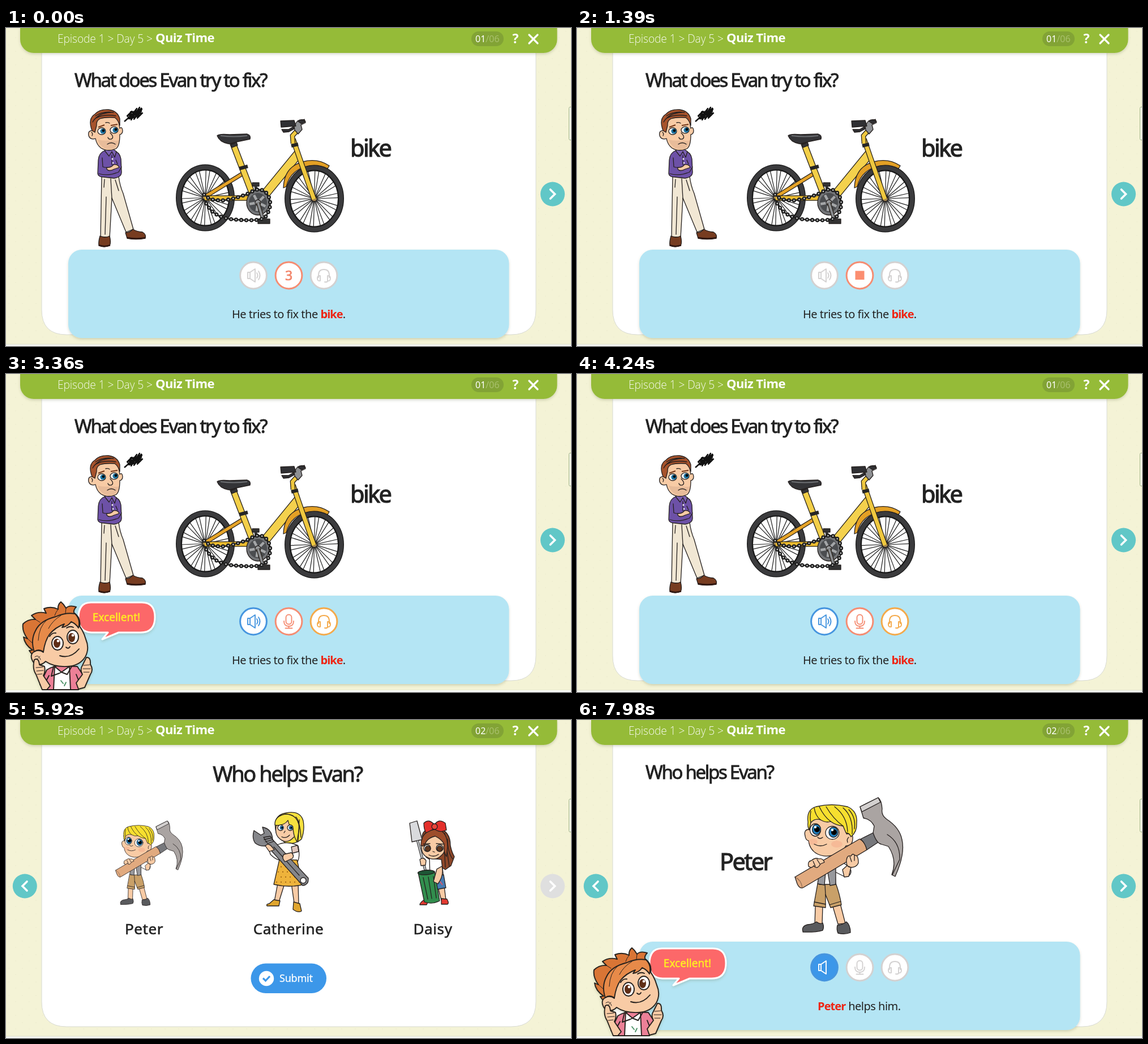
Write an HTML page that moves like this. It is 998 by 561 pixels and loops after 8 s.

```html
<!DOCTYPE html>
<html lang="en">
<head>
<meta charset="utf-8">
<title>Quiz Time</title>
<style>
html, body { margin: 0; width: 100%; height: 100%; overflow: hidden; background: #f4f3d6; }
svg { display: block; width: 100%; height: 100%; }
text { font-family: "Noto Sans", "Open Sans", sans-serif; fill: #222; white-space: pre; }
.title, .big, .ask { stroke: #222; stroke-width: .9px; }
.title { font-size: 33px; letter-spacing: -2.3px; }
.big { font-size: 41.5px; letter-spacing: -2.6px; stroke-width: 1.2px; }
.ask { font-size: 38px; letter-spacing: -2.4px; text-anchor: middle; }
.line { font-size: 20px; letter-spacing: -.5px; }
.red { fill: #ee2413; font-weight: 700; letter-spacing: -.9px; }
.name { font-size: 26px; letter-spacing: .6px; text-anchor: middle; fill: currentColor; stroke: currentColor; stroke-width: .6px; }
.o { stroke: #25201f; stroke-width: 1.3; stroke-linejoin: round; stroke-linecap: round; }
.n { fill: none; }
.skin { fill: #f8cba5; }
.icon { fill: none; stroke: currentColor; stroke-width: 1.9; stroke-linejoin: round; stroke-linecap: round; }
</style>
</head>
<body>
<svg viewBox="0 0 998 561" preserveAspectRatio="none">
<defs>
  <filter id="soft" x="-10%" y="-10%" width="120%" height="130%"><feDropShadow dx="0" dy="2.5" stdDeviation="2" flood-color="#5d6b3c" flood-opacity=".24"/></filter>
  <pattern id="dots" width="24" height="24" patternUnits="userSpaceOnUse"><g fill="#efeed0"><circle cx="5" cy="6" r="1"/><circle cx="17" cy="17" r="1"/></g></pattern>
  <linearGradient id="tube" x2="1" y2="1"><stop stop-color="#ffe887"/><stop offset="1" stop-color="#eec12f"/></linearGradient>

  <g id="boy">
    <path class="o skin" d="M421 328L420 361L433 361L434 328ZM451 326L461 360L474 359L465 324Z"/>
    <path class="o" fill="#595a5d" d="M399 373Q396 364 407 361Q418 360 423 356Q430 361 434 358Q437 366 434 371Q420 375 399 374ZM460 362Q468 362 476 356Q483 362 483 375Q473 379 461 376Q458 369 460 362Z"/>
    <path class="o" fill="#c9a068" d="M425 289L457 288Q464 307 467 326L448 331L439 308L439 331L418 328Z"/>
    <path class="o n" d="M419 321L439 325M446 326L466 320M438 290L439 309"/>
    <path class="o" fill="#fff" d="M430 250L461 248Q480 255 484 266Q484 277 472 276L456 268L457 290H428Z"/>
    <path class="o" fill="#97989c" d="M430 254L425 289L437 291L439 269ZM443 269L447 292L457 290L457 247Z"/>
    <path class="o skin" d="M410 193Q400 193 403 205Q404 212 409 213Q411 229 424 236Q437 243 455 238Q469 234 475 222Q487 222 487 209Q488 199 476 201L476 172L414 172Z"/>
    <ellipse cx="417" cy="215" rx="8" ry="5" fill="#f2a181" opacity=".4"/><ellipse cx="459" cy="219" rx="10" ry="6" fill="#f2a181" opacity=".4"/>
    <path class="o n" d="M480 207Q476 210 478 216M425 207Q429 211 434 207M419 219Q430 225 441 219"/>
    <path class="o" fill="#f7df2f" d="M408 180Q405 158 422 153Q450 146 478 153Q496 161 494 182Q495 197 484 206Q481 199 475 199L470 187Q458 186 448 179Q440 182 430 176Q420 173 413 181L410 194Q407 188 408 180Z"/>
    <path class="o n" stroke-width=".9" d="M419 155Q421 169 430 176M428 153Q436 170 448 179M440 153Q453 175 470 187M455 153Q477 170 478 197M470 155Q488 170 486 201M480 158Q493 172 490 192M413 161Q411 172 413 181"/>
    <g class="o"><ellipse cx="421" cy="194" rx="9.5" ry="11" fill="#fff"/><ellipse cx="451" cy="199" rx="12" ry="11.5" fill="#fff"/><ellipse cx="423" cy="193" rx="7.5" ry="9" fill="#207fbe"/><ellipse cx="453" cy="198" rx="8" ry="9" fill="#207fbe"/></g>
    <circle cx="424" cy="193" r="5"/><circle cx="454" cy="198" r="5"/><circle cx="421" cy="189" r="2.2" fill="#fff"/><circle cx="451" cy="194" r="2.2" fill="#fff"/>
    <path class="o" fill="#e1aa7f" d="M385 277L499 210Q509 215 512 229L399 296Q393 298 389 289Z"/>
    <path class="o n" d="M385 277Q396 282 398 296" opacity=".45"/>
    <path class="o" fill="#77787c" d="M501 210L525 198L533 215L512 229Q509 217 501 210Z"/>
    <path class="o" fill="#aaa4a2" d="M500 153L532 137Q538 141 539 157Q537 168 547 175Q570 190 574 211Q580 236 562 276L556 273Q566 247 550 223L537 219Q529 217 523 199L525 187Q519 175 506 173Z"/>
    <path class="o" fill="#d3d0cf" d="M500 153L532 137L536 145L503 162Z"/>
    <path class="o n" d="M548 202Q571 216 570 246L557 273"/>
    <path class="o skin" d="M409 258Q407 249 414 248Q421 242 427 245Q434 243 437 251L430 254Q424 265 418 257Q414 263 409 258ZM476 247Q477 238 484 240Q487 234 491 239Q497 238 497 252Q494 260 484 260Q475 260 476 247ZM469 264L477 257L484 260L480 276L472 277Z"/>
    <path class="o n" d="M417 249L421 258M424 246L429 254M482 241L485 250M490 239L490 248"/>
  </g>

  <g id="girlA">
    <path class="o skin" d="M480 288L474 320L482 321L492 289ZM504 288L509 323L517 325L516 287Z"/>
    <path class="o" fill="#e0a52d" d="M473 317L484 319L482 328L461 328Q459 325 465 324ZM508 321L519 324L522 337Q516 341 507 334Z"/>
    <path class="o" fill="#f6e13f" d="M477 198Q470 168 494 164Q520 159 525 178Q528 194 522 210Q510 221 492 216Z"/>
    <path class="o skin" d="M478 183Q473 202 484 210Q496 220 508 207Q516 201 512 188L501 174Z"/>
    <path class="o" fill="#f6e13f" d="M475 185Q474 170 493 166Q516 166 518 190L514 215Q508 206 507 191Q500 188 498 177Q492 186 478 186Z"/>
    <g class="o" fill="#fff"><ellipse cx="485" cy="190" rx="5" ry="5"/><ellipse cx="502" cy="190" rx="5" ry="5"/></g><circle cx="487" cy="190" r="3.4" fill="#23669b"/><circle cx="503" cy="190" r="3.4" fill="#23669b"/><circle cx="488" cy="190" r="1.7"/><circle cx="504" cy="190" r="1.7"/>
    <path class="o n" d="M493 196L491 199M487 206Q494 210 501 203M518 176L516 215M512 171Q519 178 521 207"/>
    <path class="o" fill="#fff" d="M485 218Q502 214 516 222Q520 240 515 250L484 247Q477 247 467 237L464 226Q474 222 485 218Z"/>
    <path class="o" fill="#dec4bb" d="M504 224L515 221L517 232L506 235Z"/>
    <path class="o" fill="#eeb33b" d="M483 246L514 247Q520 270 522 291Q498 296 473 290Z"/>
    <path d="M486 259H513M481 268H516M486 277H520M478 286H520" stroke="#a76b18" stroke-width="2.3" stroke-dasharray="0 8" stroke-linecap="round"/>
    <path class="o" fill="#85868a" d="M438 195L450 203L456 200L453 189Q470 192 471 211L534 279Q535 291 524 292L461 222Q449 224 440 217Q434 208 438 195Z"/>
    <path class="o n" d="M473 224L518 274M455 207L467 205L473 214L462 218ZM456 211L469 208M458 215L471 211"/><circle class="o" cx="525" cy="283" r="5" fill="#fff"/>
    <path class="o skin" d="M458 222Q464 216 470 224L474 229L465 232ZM491 237L504 234Q510 239 506 244L493 250Q486 243 491 237Z"/>
  </g>

  <g id="girlB">
    <path class="o" fill="#8d4729" d="M735 205Q737 189 762 191Q785 195 785 222Q788 235 792 241L786 257L776 264L742 242Z"/>
    <path class="o n" d="M775 200Q779 232 783 258M780 210Q780 234 789 245M770 200Q775 228 776 260"/>
    <path class="o skin" d="M763 295L769 318L777 317L774 293ZM742 299L739 319L746 320L752 299Z"/>
    <path class="o" fill="#e33a31" d="M769 315L779 316Q783 323 780 325H769ZM739 317L746 319L743 326H731Q731 322 739 317Z"/>
    <path class="o" fill="#fff" d="M748 244L769 246L773 278H749Z"/>
    <path class="o" fill="#477bb2" d="M753 274L773 273L777 296L755 300Z"/><path class="n" stroke="#d8596b" stroke-width="2" d="M766 284l5 7"/>
    <path class="o skin" d="M735 217Q731 234 742 241Q758 251 770 238Q778 231 774 216L764 204H747Z"/>
    <path class="o" fill="#9d4d2b" d="M733 222Q732 197 757 193Q780 193 780 224L778 241Q772 231 774 219Q769 210 758 205Q743 208 739 222Z"/>
    <path class="o" fill="#e4302b" d="M757 185Q747 173 738 182Q738 193 742 199L756 192Q767 200 778 194L776 182Q764 173 757 185Z"/><circle class="o" cx="757" cy="188" r="5" fill="#ec463b"/>
    <g class="o"><circle cx="744" cy="226" r="6" fill="#fff"/><circle cx="766" cy="226" r="6" fill="#fff"/><circle cx="745" cy="227" r="4.8" fill="#62381f"/><circle cx="766" cy="227" r="4.8" fill="#62381f"/></g>
    <path class="o n" d="M754 232L757 233M747 238Q756 243 764 237M737 219L749 218M760 218L773 219"/>
    <path class="o" fill="#d9dadd" d="M713 182L726 178L735 211L717 215Z"/><path class="n" d="M727 213L742 270" stroke="#333" stroke-width="4.6"/><path class="n" d="M727 213L742 270" stroke="#c2c4c7" stroke-width="2.4"/>
    <path class="o" fill="#318d4d" d="M728 269Q742 262 757 267L766 319Q753 326 739 321Z"/><ellipse class="o" cx="742" cy="269" rx="14.5" ry="4" fill="#1d5635" transform="rotate(-4 742 269)"/>
    <path class="o n" d="M737 278L745 316M746 277L752 315M755 276L760 314"/>
    <path class="o skin" d="M731 246Q738 241 742 248L741 256L733 257ZM761 263L770 258Q774 274 763 289L755 285Z"/>
  </g>
</defs>

<rect width="998" height="561" fill="#f4f3d6"/><rect width="998" height="557" fill="url(#dots)"/>
<path d="M63 0H936V497Q936 541 892 541H107Q63 541 63 497Z" fill="#fff" stroke="#d8dad3"/>
<path d="M0 558H998V561H0Z" fill="#fafbf8"/><path d="M0 558H998" stroke="#d9dccb"/>
<rect x="994.5" y="139.5" width="10" height="58" rx="2" fill="#f7f8e8" stroke="#9db184"/>
<path d="M25 0H973.5V20A24 24 0 0 1 949.5 44H49A24 24 0 0 1 25 20Z" fill="#95bb39" filter="url(#soft)"/>
<text x="91" y="26" style="font-family:'Open Sans','Noto Sans',sans-serif;font-size:19.2px;font-weight:300;letter-spacing:-.1px;fill:#fff" opacity=".93">Episode 1 &gt; Day 5 &gt;</text>
<text x="264" y="25" style="font-size:22px;font-weight:700;letter-spacing:-.6px;fill:#fff">Quiz Time</text>
<rect x="822" y="6" width="57" height="26" rx="13" fill="#82a335"/>
<text x="829" y="25" style="font-size:16px;font-weight:500;fill:#fff"><tspan id="count">01</tspan><tspan fill="#a9c06c" font-weight="400">/06</tspan></text>
<text x="894.5" y="27" style="font-size:23px;font-weight:700;fill:#fff">?</text>
<path d="M924 12L939 27M939 12L924 27" stroke="#fff" stroke-width="3.2" stroke-linecap="round"/>
<g id="prev"><circle cx="33.3" cy="293" r="21.5" fill="#61c7c7"/><path class="n" d="M37 285L29 293L37 301" stroke="#fff" stroke-width="3.6" stroke-linecap="round"/></g>
<circle id="next" cx="965.5" cy="293" r="21.5"/><path class="n" d="M961.5 285L969.5 293L961.5 301" stroke="#fff" stroke-width="3.6" stroke-linecap="round"/>

<g id="first">
  <text class="title" x="121" y="104">What does Evan try to fix?</text>
  <text class="big" x="608" y="227">bike</text>
  <g id="man">
    <path class="o" fill="#f1e7d4" d="M169 262L167 368L183 370L187 300L212 360L225 355L207 292Q201 278 199 262Z"/>
    <path class="o n" d="M185 266L187 301M193 268L199 287M174 267L173 281M177 298L175 364" stroke-width=".8"/>
    <path class="o" fill="#773c20" d="M166 367Q175 371 183 367Q186 379 183 384Q173 388 164 384Q163 377 166 367ZM211 361Q219 361 224 355Q230 359 241 360Q248 364 246 371Q229 374 214 371Z"/>
    <path class="n" d="M164 383Q174 387 184 383M214 370Q231 373 246 370" stroke="#321811" stroke-width="2.5"/>
    <path class="o" fill="#6d51a7" d="M175 216Q164 220 163 233L162 257Q163 263 173 263L191 265Q205 263 204 253L203 231Q201 219 191 217Z"/>
    <path class="o" fill="#7b60b2" d="M174 216L182 226L187 218L192 228L195 218L187 212Z"/>
    <path class="o n" d="M170 229L171 245Q184 249 194 241M164 257Q181 262 199 254L204 245M187 225L187 241M194 233L197 240"/>
    <path class="o skin" d="M178 246Q185 247 190 241Q198 240 200 246L191 249Q182 254 178 249Z"/>
    <g fill="#fff"><circle cx="188" cy="231" r="1.5"/><circle cx="189" cy="238" r="1.3"/></g>
    <path class="o skin" d="M154 181Q144 180 146 190Q149 198 158 195Q160 206 168 212Q180 219 194 213Q201 209 201 188Q206 187 206 181Q205 173 201 177L197 155L162 158Z"/>
    <path d="M162 197Q168 214 185 215Q198 211 200 198Q195 200 186 198Q173 200 162 197Z" fill="#cfa58a" opacity=".4"/>
    <path class="o" fill="#a7532c" d="M152 181Q144 160 157 152Q165 143 181 144Q197 146 201 160L201 172Q198 162 192 158Q175 157 166 160Q159 164 160 172L157 184Z"/>
    <path class="o n" stroke-width=".8" d="M153 166Q162 150 185 149M157 160Q172 151 194 155M158 155Q172 146 190 149"/>
    <g class="o" fill="#fff"><ellipse cx="169" cy="182" rx="7" ry="6"/><ellipse cx="191" cy="180" rx="7" ry="5.8"/></g>
    <circle cx="171" cy="182" r="4.6" fill="#1d729f"/><circle cx="193" cy="180" r="4.6" fill="#1d729f"/><circle cx="172" cy="181" r="2.4"/><circle cx="194" cy="179" r="2.4"/>
    <path class="n" d="M163 175L174 171M185 172L197 170" stroke="#743819" stroke-width="2.2"/>
    <path class="o n" d="M184 185Q192 193 186 196Q181 197 180 193M179 205Q186 200 193 205M151 184Q154 186 152 190M176 167Q180 166 183 168"/>
    <path class="n" d="M209 165L217 158L214 155L222 147L217 160L231 142L221 162L236 140L226 161L240 143L232 159L241 150L217 154L239 147L220 148L237 154L218 160L240 141" stroke="#111" stroke-width="2.4" stroke-linejoin="round"/>
  </g>
  <g id="bike"></g>
</g>

<g id="second">
  <text class="ask" x="497" y="109">Who helps Evan?</text>
  <rect id="frame" x="122" y="147.5" width="245" height="251.5" rx="14" fill="none" stroke="#ec7449" stroke-width="2"/>
  <use href="#boy" transform="translate(-45.8 92.8) scale(.622)"/>
  <use href="#girlA"/><use href="#girlB"/>
  <g color="#222"><text id="pick" class="name" x="244" y="378">Peter</text><text class="name" x="499" y="378">Catherine</text><text class="name" x="754" y="378">Daisy</text></g>
  <rect x="432.5" y="429.5" width="133.5" height="52.5" rx="26.2" fill="#3c97e9"/>
  <circle cx="460" cy="456" r="13.2" fill="#fff"/><path class="n" d="M454 455.5L458.5 460L466 452" stroke="#3c97e9" stroke-width="3.2"/>
  <text x="483" y="462" style="font-size:18px;fill:#fff;letter-spacing:-.2px;stroke:#fff;stroke-width:.3px">Submit</text>
</g>

<g id="third">
  <text class="title" x="121" y="104">Who helps Evan?</text>
  <text class="big" x="252" y="265">Peter</text>
  <use href="#boy"/>
</g>

<g id="panel">
  <rect x="110" y="391" width="778.5" height="156" rx="24" fill="#b4e5f4" filter="url(#soft)"/>
  <g id="listen"><circle cx="437" cy="436.5" r="23.4" stroke="currentColor" stroke-width="3"/>
    <g id="speaker" class="icon"><path d="M427 431H431L440 425V448L431 442H427ZM431 431V442"/><path id="waves" d="M443 432Q446 436.5 443 441M446 429Q451 436.5 446 444"/></g></g>
  <g id="record"><circle cx="499.5" cy="436.5" r="23.4" fill="#fff" stroke="currentColor" stroke-width="3"/>
    <g id="mic" class="icon"><rect x="494.5" y="424.5" width="10" height="17" rx="5"/><path d="M491 436Q491 445 499.5 445Q508 445 508 436M499.5 445V448M493.5 448.5H505.5"/></g>
    <rect id="stop" x="491.5" y="428.5" width="16" height="15.5" fill="#fb8e70"/>
    <text id="digit" x="499.5" y="445" text-anchor="middle" style="font-size:23px;fill:#f28368;stroke:#f28368;stroke-width:.7px">3</text></g>
  <g id="replay"><circle cx="561.5" cy="436.5" r="23.4" fill="#fff" stroke="currentColor" stroke-width="3"/>
    <path class="icon" d="M552 440V436Q552 426 561.5 426Q571 426 571 436V440M555 437V446Q550 447 550 441.5Q550 437 555 437ZM568 437V446Q573 447 573 441.5Q573 437 568 437ZM569 446Q567 449 563 448"/></g>
  <text id="say1" class="line" x="399" y="512">He tries to fix the <tspan class="red">bike</tspan>.</text>
  <text id="say2" class="line" x="425" y="512"><tspan class="red">Peter</tspan> helps him.</text>
</g>

<g id="praise">
  <path d="M150 403H240Q263 403 263 429Q263 456 238 456H199L170 468L180 456H151Q128 455 128 430Q128 403 150 403Z" fill="#fc6769" stroke="#fff" stroke-width="3" stroke-linejoin="round" filter="url(#soft)"/>
  <text x="195" y="436" text-anchor="middle" style="font-size:19px;fill:#ffed22;stroke:#ffed22;stroke-width:.5px">Excellent!</text>
  <g class="o" filter="url(#soft)" style="stroke-width:1.9">
    <path fill="#ec8097" d="M72 522Q86 513 103 515L126 516L142 540L136 549L128 540V557H70V543L60 548Z"/>
    <path fill="#fff" d="M86 516L98 526L112 516L114 557H84Z"/>
    <path class="n" d="M84 516L80 533L94 528L98 526L108 530L116 516M70 543L76 532M128 540L124 530"/>
    <path fill="#d97436" d="M50 500L41 488L47 487Q33 478 31 464L38 467Q28 454 30 441Q39 432 52 433L45 426Q57 418 71 422L67 414Q80 409 92 415Q91 407 97 402Q102 406 106 413Q112 407 124 411Q119 416 120 421Q133 430 130 446L70 495Z"/>
    <path class="skin" d="M66 491Q63 470 76 455Q98 436 124 438Q136 450 141 468Q148 484 140 499Q130 515 108 516Q84 517 70 507Q59 518 48 508Q40 495 51 489Q60 486 66 491Z"/>
    <path fill="#e78a48" d="M50 490Q43 470 52 453Q60 435 88 428Q106 420 122 423Q132 433 128 448Q123 440 115 437Q110 445 99 447L103 441Q87 447 77 459Q69 470 66 490Q57 484 50 490Z"/>
    <path class="n" stroke-width="1" d="M51 499Q58 494 61 504M56 502L60 498M97 426Q82 435 75 449M72 434Q58 446 57 470M92 415Q88 420 86 426M106 413L105 422M38 467L47 475M52 433L60 438"/>
    <g fill="#fff"><ellipse cx="91" cy="475" rx="10" ry="12"/><ellipse cx="118" cy="464" rx="10" ry="12"/></g>
    <g fill="#5e2e18" stroke="none"><ellipse cx="90" cy="475" rx="6" ry="8"/><ellipse cx="116" cy="465" rx="6" ry="8"/></g>
    <g stroke="none" fill="#fff"><circle cx="92" cy="471" r="2.3"/><circle cx="118" cy="461" r="2.3"/></g>
    <path class="n" d="M77 463Q81 456 88 457M107 448Q113 444 119 447M106 482Q110 486 113 481M95 497Q114 503 129 485"/>
    <path class="skin" d="M53 530Q46 520 50 504Q58 500 59 513L68 516Q70 525 66 532L78 550L72 557H64ZM135 514L142 500Q150 499 149 512Q155 522 149 530L139 553L128 556L124 545L135 530Q130 521 135 514Z"/>
    <path class="n" stroke-width="1" d="M53 518L65 517M54 524L66 523M55 530L64 529M137 514L148 513M136 520L149 520M137 526L147 526"/>
    <path d="M97 541l4 5m5-2l-3 6" stroke="#4b9266"/>
  </g>
  <path d="M0 558H998V561H0Z" fill="#fafbf8"/>
</g>
</svg>
<script>
const $ = id => document.getElementById(id);

function wheel(cx, cy, rx, ry) {
  let spokes = '';
  for (let i = 0; i < 28; i++) {
    const a = i * Math.PI / 14, b = a + (i % 2 ? .03 : -.03);
    spokes += `M${cx + 4 * Math.cos(a)} ${cy + 4 * Math.sin(a)}L${cx + (rx - 9) * Math.cos(b)} ${cy + (ry - 9) * Math.sin(b)}`;
  }
  const ring = (inset, color, width) =>
    `<ellipse cx="${cx}" cy="${cy}" rx="${rx - inset}" ry="${ry - inset}" fill="none" stroke="${color}" stroke-width="${width}"/>`;
  return `<path d="${spokes}" stroke="#242424" stroke-width="1.25"/>` + ring(5.5, '#181818', 11) + ring(5, '#3b3b3d', 7.5) +
    `<circle class="o" cx="${cx}" cy="${cy}" r="5" fill="#a78851"/>`;
}

function tube(d, width, color = 'url(#tube)') {
  const path = (stroke, w) => `<path d="${d}" fill="none" stroke="${stroke}" stroke-width="${w}"/>`;
  return path('#272119', width + 2.6) + path(color, width);
}

function chain(d) {
  const path = (color, width, dash) => `<path d="${d}" fill="none" stroke="${color}" stroke-width="${width}" stroke-linecap="round" stroke-dasharray="${dash}"/>`;
  return path('#202020', 2.4, 'none') + path('#202020', 7.2, '0 9') + path('#ddd', 2.4, '0 9');
}

function drawBike() {
  let gear = '';
  for (let i = 0; i < 5; i++) {
    const a = i * Math.PI * .4 - .8;
    gear += `M445 308L${445 + 15 * Math.cos(a)} ${308 + 15 * Math.sin(a)}`;
  }
  $('bike').innerHTML = wheel(352, 299.5, 52, 59) + wheel(544.5, 301, 52.5, 59.5) +
    tube('M351 298L421 255', 5, '#e6a428') + tube('M351 300L431 300', 7, '#edbd30') +
    tube('M401 204L434 290', 9, '#f3cf48') + tube('M457 294L516 222', 14, '#f4d14d') +
    '<path class="o" fill="#e3a025" d="M490 282Q491 245 524 236Q550 229 571 243L568 248Q548 238 527 245Q501 254 495 280Z"/>' +
    tube('M507 196L518 228L544 302', 7, '#efc83f') + tube('M507 204L506 190L517 178', 6, '#efc83f') +
    '<path class="o" fill="#8e9093" d="M509 173L514 165L527 161L529 167L521 171L523 179L516 187L510 180Z"/>' +
    '<path class="o" fill="#303033" d="M485 164L509 163L512 173L486 175ZM487 179L499 179L508 174L509 178L500 183L490 184ZM515 164Q524 159 529 165L522 169Z"/>' +
    '<path class="o" fill="#343437" d="M373 190Q377 186 395 188L426 187Q433 189 431 196L407 201Q400 207 392 204Q377 201 373 190ZM396 204L407 201L409 207L399 211Z"/>' +
    '<path class="n" d="M379 190Q402 193 426 190" stroke="#6b6d70" stroke-width="2"/>' +
    '<path d="M412 248L427 244M504 208L516 205" stroke="#252525" stroke-width="6"/>' +
    '<path class="o" fill="#333" d="M435 273H447V279H435ZM445 337H466V345H445Z"/>' +
    '<path d="M441 279L445 308" stroke="#333" stroke-width="5"/>' +
    '<ellipse class="o" cx="445" cy="308" rx="20" ry="22" fill="#747679"/><ellipse cx="445" cy="308" rx="16" ry="17" fill="#4b4d50"/>' +
    `<path d="${gear}" stroke="#a4a6a8" stroke-width="4.5"/><circle class="o" cx="445" cy="308" r="5" fill="#989a9c"/>` +
    tube('M445 308L454 338', 4, '#8b8d90') +
    chain('M350 294Q359 305 385 304Q411 300 432 290Q449 279 461 292Q474 312 457 335Q443 342 395 337Q368 332 358 316L349 302');
}

const show = (id, on) => $(id).style.display = on ? '' : 'none';
const tint = (id, color) => $(id).style.color = color;

function render(t) {
  const q1 = t < 5350, answer = t >= 7920, asking = !q1 && !answer;
  const counting = t < 960, recording = t < 2130;
  const grey = '#d3d1d1';

  show('first', q1);
  show('second', asking);
  show('third', answer);
  show('panel', !asking);
  show('prev', !q1);
  show('praise', answer || (t >= 2130 && t < 4180));
  show('say1', q1);
  show('say2', answer);
  $('count').textContent = q1 ? '01' : '02';
  $('next').setAttribute('fill', asking ? '#dfdfdf' : '#61c7c7');

  const chosen = t >= 6210;
  show('frame', chosen);
  tint('pick', chosen ? '#ec7449' : 'inherit');

  show('digit', counting);
  show('stop', recording && !counting);
  show('mic', !recording);
  $('digit').textContent = t < 280 ? 3 : t < 620 ? 2 : 1;

  tint('listen', recording ? grey : '#4695df');
  $('listen').setAttribute('fill', answer ? '#3c97e9' : '#fff');
  tint('speaker', answer ? '#fff' : 'inherit');
  show('waves', !answer);
  tint('record', answer ? grey : '#f58d73');
  tint('replay', recording || answer ? grey : '#f4aa4b');
}

function tick() {
  render(performance.now() % 8000);
  requestAnimationFrame(tick);
}

drawBike();
tick();
</script>
</body>
</html>
```
